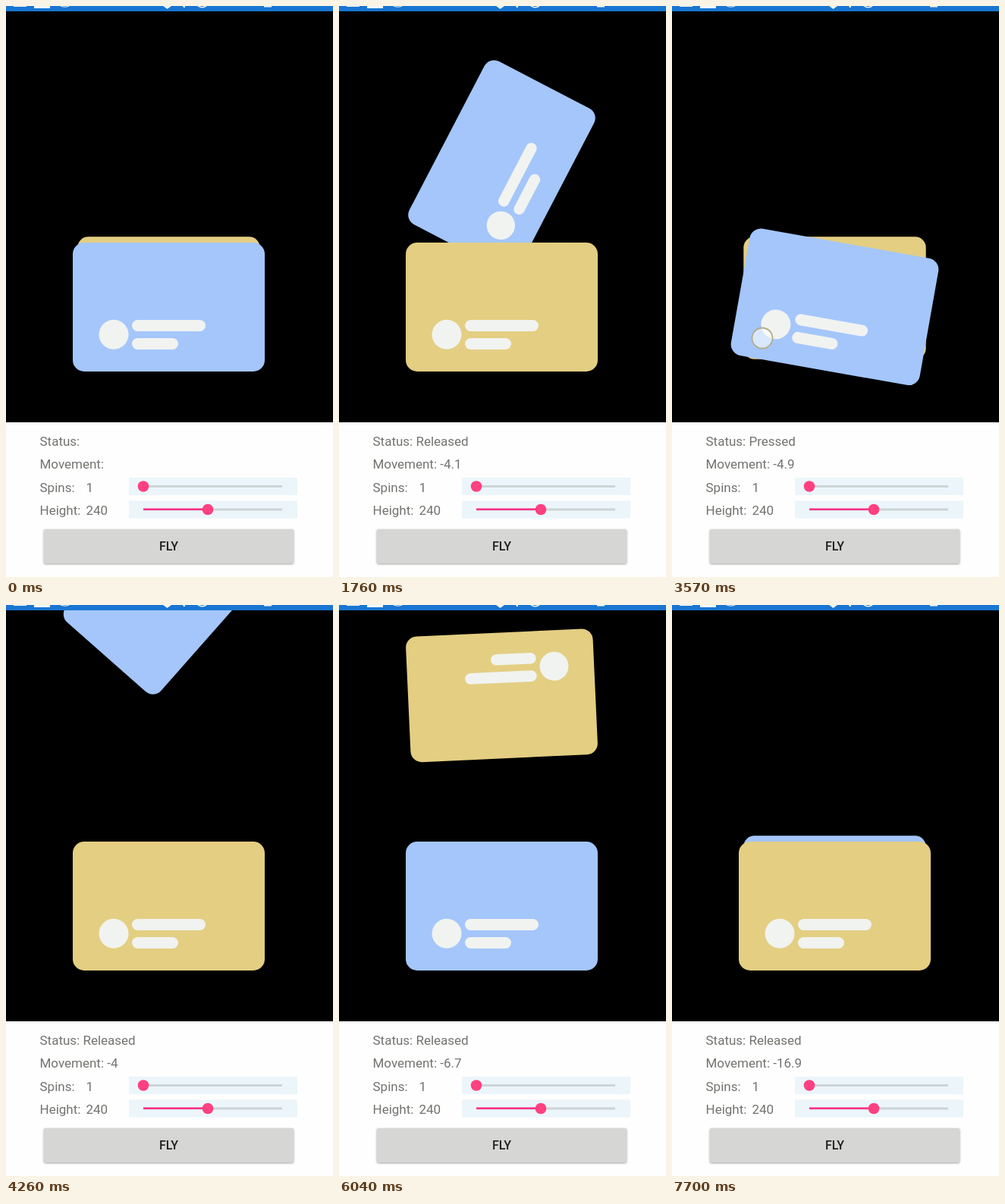
Animation of 431x753 px, one loop 8000 ms. Source, as an HTML page:

```html
<!DOCTYPE html>
<html lang="en">
<head>
<meta charset="utf-8">
<title>Flying cards</title>
<style>
  html, body { margin: 0; width: 100%; height: 100%; overflow: hidden; background: #000; }
  svg { display: block; width: 100%; height: 100%; }
  text { font: 17px Roboto, "Open Sans", sans-serif; fill: #72726e; white-space: pre; }
  .blue { fill: #a4c6fb; }
  .yellow { fill: #e3ce82; }
  .mark { fill: #f1f3f0; }
  .box { fill: #ecf6fa; }
  .track { fill: #cdd4d6; }
  .on { fill: #ff2f8a; }
  .thumb { fill: #ff4081; }
  .touch { fill: #fff; fill-opacity: .58; stroke: #b3ab8d; stroke-width: 1.8; }
  .button { fill: #d6d7d4; filter: drop-shadow(0 1.5px 1.5px rgba(0, 0, 0, .38)); }
  text.label { font-size: 16px; font-weight: 500; fill: #1d1d1d; text-anchor: middle; }
</style>
</head>
<body>
<svg viewBox="0 0 431 753">
  <defs>
    <g id="face">
      <rect x="-126.5" y="-85" width="253" height="170" rx="15"/>
      <g class="mark">
        <circle cx="-72.5" cy="36.3" r="19.5"/>
        <rect x="-48.5" y="17" width="97" height="15" rx="7.5"/>
        <rect x="-48.5" y="41" width="61" height="15" rx="7.5"/>
      </g>
    </g>
  </defs>
  <rect width="431" height="753"/>

  <g id="deck">
    <use id="yellow" class="yellow" href="#face"/>
    <use id="blue" class="blue" href="#face"/>
  </g>
  <circle id="touch" class="touch" r="13.5"/>

  <rect width="431" height="7" fill="#1976d2"/>
  <g fill="#f4f8fc">
    <rect x="10" width="17" height="1"/>
    <rect x="37" width="21" height="3"/>
    <path d="M71 0h3q4 1.5 7 0h3q-6 3.5 -13 0z"/>
    <path d="M207 0h11l-5.5 4z"/>
    <path d="M233 0h3v2h-2z"/>
    <path d="M252 0h3q3.5 2 7 0h3q-6 5 -13 0z"/>
    <rect x="340" width="10" height="1.5"/>
  </g>

  <rect y="549" width="431" height="204" fill="#fefefe"/>
  <text id="status" x="44.5" y="580"></text>
  <text id="move" x="44.5" y="610"></text>
  <text x="44.5" y="640.5">Spins:</text>
  <text x="105.5" y="640.5">1</text>
  <text x="44.5" y="670.5">Height:</text>
  <text x="105.5" y="670.5">240</text>

  <rect class="box" x="162" y="622" width="222" height="23"/>
  <rect class="track" x="181" y="632" width="183" height="3"/>
  <circle class="thumb" cx="181" cy="633.5" r="7.3"/>
  <rect class="box" x="162" y="652.5" width="222" height="23"/>
  <rect class="track" x="181" y="662.5" width="183" height="3"/>
  <rect class="on" x="181" y="662.5" width="85" height="2.5"/>
  <circle class="thumb" cx="266" cy="664" r="7.3"/>

  <rect class="button" x="50" y="690" width="329" height="45" rx="2"/>
  <text class="label" x="214.5" y="718">FLY</text>
</svg>
<script>
  const LOOP = 8000, CX = 214.5, FRONT_Y = 397, BACK_Y = 385, BACK_SCALE = 0.95;
  const $ = id => document.getElementById(id);
  const deck = $('deck'), cards = [$('blue'), $('yellow')];
  const clamp = v => Math.min(1, Math.max(0, v));
  const ease = v => v * v * (3 - 2 * v);

  // Monotone cubic through the given points.
  function curve(xs, ys) {
    const d = xs.slice(1).map((x, i) => (ys[i + 1] - ys[i]) / (x - xs[i]));
    const m = xs.map((_, i) => {
      if (i === 0) return d[0];
      if (i === d.length) return d[i - 1];
      const a = d[i - 1], b = d[i];
      return a * b > 0 ? 2 * a * b / (a + b) : 0;
    });
    return x => {
      if (x <= xs[0]) return ys[0];
      if (x >= xs[xs.length - 1]) return ys[ys.length - 1];
      let i = 0;
      while (x > xs[i + 1]) i++;
      const h = xs[i + 1] - xs[i], u = (x - xs[i]) / h, v = 1 - u;
      return ys[i] * v * v * (1 + 2 * u) + ys[i + 1] * u * u * (3 - 2 * u)
        + h * u * v * (m[i] * v - m[i + 1] * u);
    };
  }

  // Height of the flying card's centre for each angle of its spin.
  const heightAt = curve(
    [0, 9.7, 12, 40, 70, 100, 131, 177, 225, 297, 339, 360],
    [397, 397, 391, -140, -190, -140, -26, 119, 144, 211, 300, 385]);

  // times: press, tilted, release, leaves the view, returns, mid fall, lands
  const throws = [
    { move: '-4.1', mid: 297, times: [560, 680, 1180, 1340, 1490, 1760, 1930] },
    { move: '-4.9', mid: 225, times: [1990, 2060, 2150, 2265, 2395, 2760, 3225] },
    { move: '-4', mid: 131, times: [3380, 3500, 3980, 4110, 4190, 4260, 4820] },
    { move: '-6.7', mid: 177, times: [5140, 5260, 5560, 5700, 5850, 6040, 6550] },
    { move: '-16.9', mid: 225, times: [6700, 6810, 7130, 7250, 7330, 7500, 7690] }
  ];
  for (const s of throws) s.angle = curve(s.times, [0, 9.5, 12, 40, 100, s.mid, 360]);

  function place(card, y, scale, angle) {
    card.setAttribute('transform', `translate(${CX} ${y}) rotate(${angle}) scale(${scale})`);
  }

  function setText(id, value) {
    if ($(id).textContent !== value) $(id).textContent = value;
  }

  function draw(t) {
    const n = throws.filter(s => t >= s.times[0]).length - 1;
    const shot = throws[n];
    const flyer = cards[Math.max(n, 0) % 2];
    const other = cards[flyer === cards[0] ? 1 : 0];
    const angle = shot ? shot.angle(t) : 0;
    const rise = ease(clamp((angle - 12) / 28));

    place(flyer, heightAt(angle), 1 - (1 - BACK_SCALE) * angle / 360, angle);
    place(other, BACK_Y + (FRONT_Y - BACK_Y) * rise, BACK_SCALE + (1 - BACK_SCALE) * rise, 0);
    const top = angle > 70 ? other : flyer;
    if (deck.lastElementChild !== top) deck.appendChild(top);

    const release = shot ? shot.times[2] : 0;
    const pressed = !!shot && t < release;
    const swipe = clamp((t - release + 120) / 120);
    $('touch').setAttribute('visibility', pressed ? 'visible' : 'hidden');
    $('touch').setAttribute('transform', `translate(119 ${438 - 50 * swipe * swipe})`);

    const last = pressed ? throws[n - 1] : shot;
    setText('status', 'Status: ' + (shot ? (pressed ? 'Pressed' : 'Released') : ''));
    setText('move', 'Movement: ' + (last ? last.move : ''));
  }

  const start = performance.now();
  function tick() {
    draw((performance.now() - start) % LOOP);
    requestAnimationFrame(tick);
  }
  tick();
</script>
</body>
</html>
```
